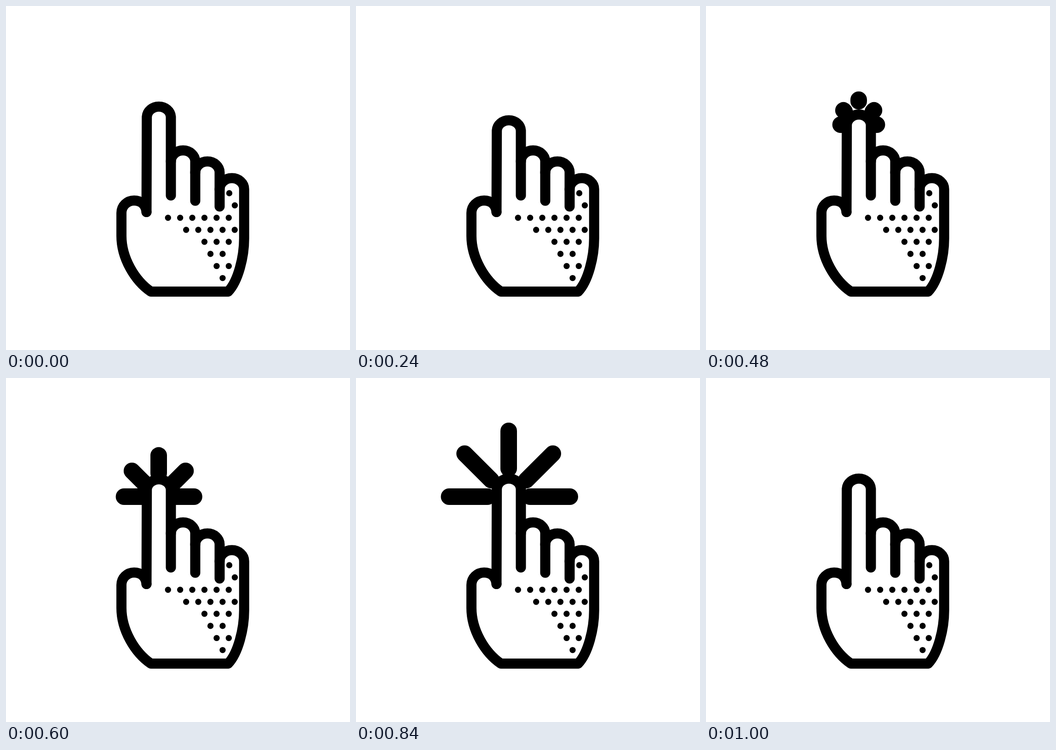
Write an HTML page without scripts that moves like this. It is 748 px wide and 748 px high and loops after 2 s.

```html
<!DOCTYPE html>
<html lang="en">
<head>
<meta charset="utf-8">
<title>Tapping hand</title>
<style>
  html, body { margin: 0; width: 100%; height: 100%; overflow: hidden; background: #fff; }
  svg { display: block; width: 100%; height: 100%; }
  path { fill: none; stroke: #000; stroke-linecap: round; stroke-linejoin: round; }

  .hand path { stroke-width: 22; }
  .hand .dots { stroke-width: 13.4; stroke-dasharray: 0 26.4; }
  .rays { animation: show 2s step-end infinite; }
  .rays path { stroke-width: 36; animation: burst 2s cubic-bezier(.3333, 0, .6667, 1) infinite; }
  .index { animation: press 2s cubic-bezier(.3333, 0, .6667, 1) infinite; }

  @keyframes press {
    0%, 32%, 100% { d: path("M305.5 448 L306.2 241 A26.2 23.7 0 0 1 358.5 241 L358.5 412"); }
    16% { d: path("M305.5 448 L306.2 276 A26.2 23.7 0 0 1 358.5 276 L358.5 412"); }
  }
  /* Each ray grows outwards, then its inner end catches up. */
  @keyframes burst {
    0%, 22% { stroke-dasharray: 0 2; stroke-dashoffset: 0; }
    40% { stroke-dasharray: 1 2; stroke-dashoffset: 0; }
    50%, 100% { stroke-dasharray: 0 2; stroke-dashoffset: -1; }
  }
  @keyframes show {
    0% { opacity: 0; }
    23.6% { opacity: 1; }
    49.6%, 100% { opacity: 0; }
  }
</style>
</head>
<body>
<svg viewBox="0 0 748 748">
  <g class="rays">
    <path pathLength="1" d="M296 258H202.5"/>
    <path pathLength="1" d="M301.2 229.2L236.2 164.4"/>
    <path pathLength="1" d="M332 207V115"/>
    <path pathLength="1" d="M363 229.2L428 164.4"/>
    <path pathLength="1" d="M368 258H465"/>
  </g>
  <g class="hand">
    <path class="index" d="M305.5 448 L306.2 241 A26.2 23.7 0 0 1 358.5 241 L358.5 412"/>
    <path d="M358.5 338A26.5 24 0 0 1 411.5 338V423.5"/>
    <path d="M411.5 362A26.5 24 0 0 1 464.5 362V436"/>
    <path d="M464.5 398.5A26.5 24 0 0 1 517.8 398.5V505C517.8 545 505 598 483 621H315C280 597 251 548 251 500V450C251 435 263 423 278.5 423C293 423 304 432 305.5 448"/>
    <path class="dots" d="M485.5 407h1M497.5 433.5h1M352.3 460.5H486M391.7 486.7H499M431.5 512.7H486M444.6 539H473M458 565.4H486M471 591.6h1"/>
  </g>
</svg>
</body>
</html>
```
